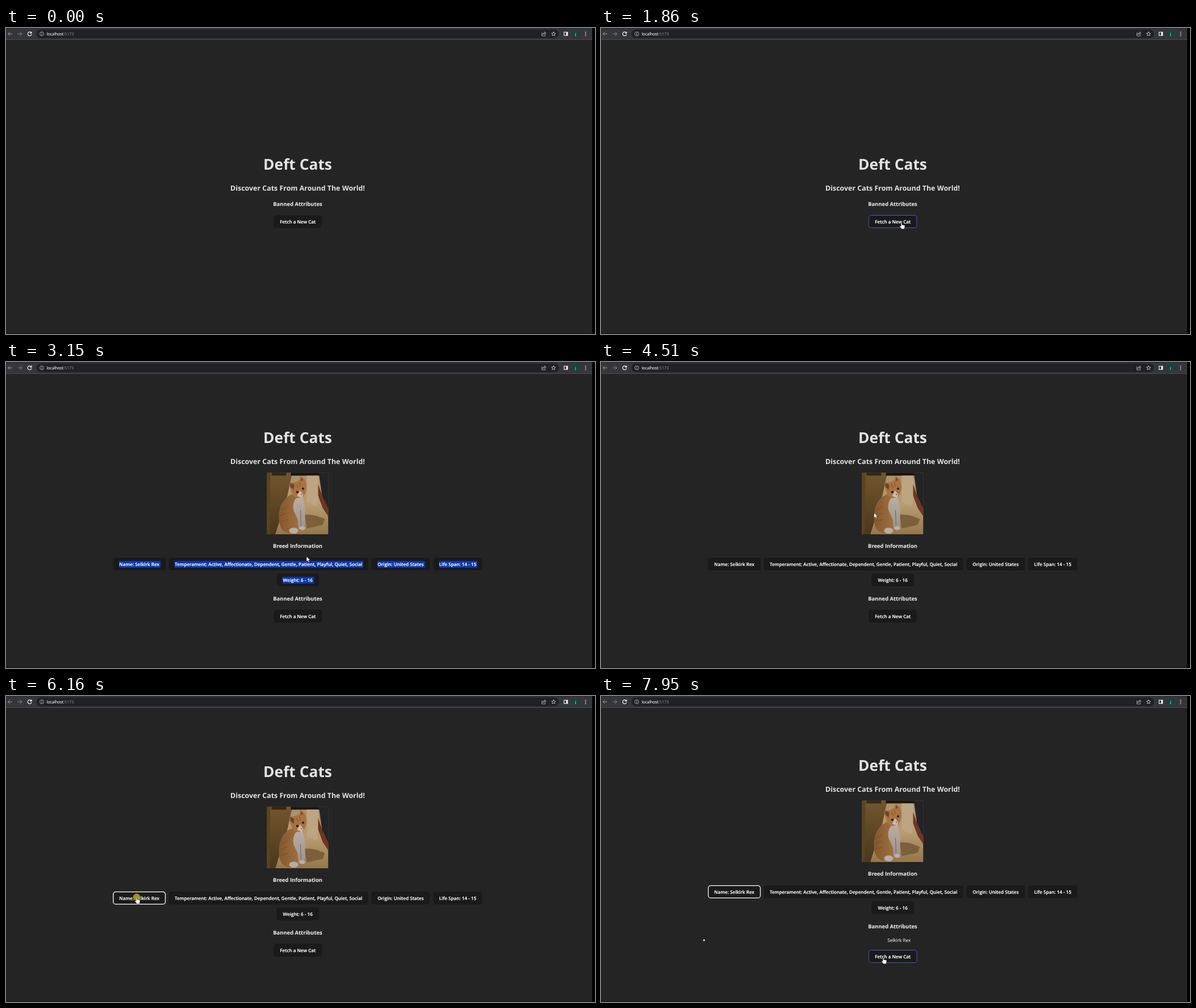
Write an HTML page that moves like this. It is 1037 px wide and 540 px high and loops after 8000 ms.

```html
<!DOCTYPE html>
<html lang="en">
<head>
<meta charset="utf-8">
<title>Deft Cats</title>
<style>
  html, body { margin: 0; width: 100%; height: 100%; overflow: hidden; background: #242424; }
  svg { display: block; width: 100vw; height: 100vh; }
  text { font-family: "Open Sans", "Noto Sans", sans-serif; fill: #e3e3e3; text-anchor: middle; text-rendering: geometricPrecision; }
  .h1 { font-size: 26.4px; font-weight: 700; }
  .h2 { font-size: 12.42px; font-weight: 700; }
  .h3 { font-size: 9.42px; font-weight: 700; stroke: #e3e3e3; stroke-width: .12; }
  .label { font-size: 8.13px; font-weight: 600; fill: #fff; stroke: #fff; stroke-width: .2; }
  .item { font-size: 8.2px; stroke: #e3e3e3; stroke-width: .1; }
  .url { font-size: 7.1px; text-anchor: start; fill: #e8eaed; stroke: #e8eaed; stroke-width: .15; }
  .url tspan { fill: #969a9e; stroke: none; }
  .box { fill: #1a1a1a; }
  .hover { fill: none; stroke: #5a61e2; stroke-width: .85; }
  .ring { fill: none; stroke: #fff; stroke-width: 1.25; }
  .mark { fill: #0b38ac; }
  .icon { fill: none; stroke: #c4c6c9; stroke-width: 1; }
</style>
</head>
<body>
<svg viewBox="0 0 1037 540" preserveAspectRatio="none">
  <defs>
    <clipPath id="frame"><rect width="108" height="108.5"/></clipPath>
    <linearGradient id="floor" x2="0" y2="1">
      <stop offset="0" stop-color="#a98f69"/><stop offset=".5" stop-color="#b89c72"/><stop offset="1" stop-color="#94764a"/>
    </linearGradient>
    <linearGradient id="wood" x2="0" y2="1">
      <stop offset="0" stop-color="#72572f"/><stop offset="1" stop-color="#4a361c"/>
    </linearGradient>
    <linearGradient id="fur">
      <stop offset="0" stop-color="#83582e"/><stop offset="1" stop-color="#a87645"/>
    </linearGradient>
    <linearGradient id="bib" x2="0" y2="1">
      <stop offset="0" stop-color="#b9ada3"/><stop offset="1" stop-color="#9d948f"/>
    </linearGradient>
    <filter id="soft" color-interpolation-filters="sRGB"><feGaussianBlur stdDeviation=".7"/></filter>
  </defs>

  <rect width="1037" height="540" fill="#242424"/>
  <rect y="538" width="1037" height="2" fill="#1d1b1d"/>

  <g id="bar">
    <rect width="1032" height="20" fill="#35363a"/>
    <rect width="1032" height="1" fill="#292a2d"/>
    <rect y="20" width="1032" height="1" fill="#4b4c50"/>
    <rect x="53.5" y="2.5" width="920" height="15.5" rx="7.7" fill="#202124"/>
    <path class="icon" style="stroke:#9a9ca0" d="M11 10.3H3.5M7 6.8 3.5 10.3 7 13.8"/>
    <path class="icon" style="stroke:#86888c" d="M20.5 10.3H28M24.5 6.8 28 10.3 24.5 13.8"/>
    <path class="icon" style="stroke:#f1f3f4;stroke-width:1.2" d="M44.4 8.3A3.4 3.4 0 1 0 45 11M45 6.5V9.2H42.2"/>
    <circle class="icon" cx="63" cy="10.3" r="3.5" style="stroke-width:.8"/>
    <path class="icon" d="M63 9.8V12.3M63 8.1V9"/>
    <text class="url" x="71.5" y="12.9">localhost<tspan>:5173</tspan></text>
    <path class="icon" style="stroke-width:.8" d="M944.5 8.5H943.5V14H949.5V12.3M945 11.8Q945.5 8.7 948.3 8.6V6.8L951 9.2 948.3 11.4V9.9Q946.4 9.9 945 11.8Z"/>
    <path class="icon" style="stroke-width:.9" d="M964 6.6 965 9.1 967.6 9.3 965.6 11 966.3 13.6 964 12.2 961.7 13.6 962.4 11 960.4 9.3 963 9.1Z"/>
    <rect x="982" y="6.8" width="7.3" height="7" fill="#f1f3f4"/>
    <rect x="983.1" y="7.9" width="3.1" height="4.8" fill="#35363a"/>
    <circle cx="1003" cy="10.3" r="6" fill="#0d4740"/>
    <text x="1003" y="12.6" style="font-size:6px;font-weight:600;fill:#e4efec">J</text>
    <g fill="#dcdee1"><circle cx="1020.5" cy="7.4" r=".9"/><circle cx="1020.5" cy="10.4" r=".9"/><circle cx="1020.5" cy="13.4" r=".9"/></g>
  </g>
  <rect x="1032" width="5" height="540" fill="#000"/>

  <g id="head">
    <text class="h1" x="513.5" y="250">Deft Cats</text>
    <text class="h2" x="513.5" y="287.4">Discover Cats From Around The World!</text>
  </g>

  <g id="breed">
    <g id="photo" transform="translate(459.5 195.5)" clip-path="url(#frame)">
      <rect width="108" height="109" fill="url(#floor)"/>
      <g filter="url(#soft)">
        <path d="M-2-2H45L36 40 14 111H-2Z" fill="url(#wood)"/>
        <path d="M-2-2H6L5 111H-2Z" fill="#5a431f"/>
        <path d="M8-2H34V5H8Z" fill="#33261a"/>
        <path d="M42-2H110V5H42Z" fill="#1b140e"/>
        <path d="M70 5H90L92 28 88 60 70 52Z" fill="#bda582"/>
        <path d="M91-2H110V72L97 42Z" fill="#222327"/>
        <path d="M90 20 97 40 110 68V80L98 62 90 40Z" fill="#6d3520"/>
        <path d="M66 74Q82 72 102 82L98 92 70 98Z" fill="#7c6039"/>
        <path d="M44 38C31 43 20 58 21 78 21 96 27 106 42 107L58 102 66 60 60 40Z" fill="url(#fur)"/>
        <path d="M51 45C46 52 45 59 47 67L54 82 56 99 64 99 67 90 67 62 63 43Z" fill="url(#bib)"/>
        <path d="M59 66 60 97" stroke="#776c64" stroke-width="1.2"/>
        <ellipse cx="47" cy="102" rx="8" ry="5.2" fill="#b8aea4"/>
        <ellipse cx="62" cy="97.5" rx="5.5" ry="3.6" fill="#b9b0a7"/>
        <path d="M40 24 40 17 48 17 57 13 59 5 66 11C71 20 71 32 65 40 58 47 46 45 43 34Z" fill="#a87340"/>
        <path d="M41 25V18L48 21 47 30Z" fill="#6a452d"/>
        <path d="M59 15 60 8 64 13Z" fill="#744a33"/>
        <path d="M58 31 61 35 64 39 61 44 53 41 55 37Z" fill="#c9bcae"/>
        <ellipse cx="53.5" cy="34" rx="2.4" ry="2.1" fill="#242016"/>
        <ellipse cx="63.5" cy="28" rx="2" ry="2.1" fill="#242016"/>
        <path d="M59 38 62 37 61 40Z" fill="#8f5848"/>
        <path d="M25 66 36 60M23 76 35 71M24 86 37 82M52 20 55 27M57 17 59 24" stroke="#704722" stroke-width="1.2" opacity=".6"/>
      </g>
    </g>
    <text class="h3" x="513.5" y="328.4">Breed Information</text>
    <g id="facts"></g>
  </g>

  <text id="banned" class="h3" x="513.5" y="313.5">Banned Attributes</text>
  <g id="item">
    <circle cx="181.4" cy="430.9" r="1.6" fill="#e3e3e3"/>
    <text class="item" x="524.7" y="433.5">Selkirk Rex</text>
  </g>
  <g id="fetch"></g>

  <circle id="dot" r="6.2" fill="#a8a10c" opacity=".92"/>
  <g id="cursor">
    <path id="arrow" d="M0 0V9.4L2.2 7.4 3.7 10.8 5.3 10.1 3.8 6.8H6.7Z" fill="#fff" stroke="#111" stroke-width=".6"/>
    <path id="hand" d="M-.9 .9Q0-.3 .9 .9V4.3L5 5.1Q6.3 5.5 6.1 7L5.2 9.9V11.8H-.3V10.6L-3 7.4Q-3.2 6.1-2 6.2L-.9 7.2Z" fill="#fff" stroke="#111" stroke-width=".5"/>
  </g>
</svg>
<script>
const LOOP = 8000, FADE = 250;
const $ = id => document.getElementById(id);
const clamp = v => Math.max(0, Math.min(1, v));
const within = (t, a, b) => t >= a && t < b;
const show = (el, on) => el.setAttribute('visibility', on ? 'visible' : 'hidden');
const move = (el, x, y) => el.setAttribute('transform', `translate(${x} ${y})`);

function add(parent, tag, attrs, text = '') {
  const el = document.createElementNS('http://www.w3.org/2000/svg', tag);
  for (const k in attrs) el.setAttribute(k, attrs[k]);
  el.textContent = text;
  return parent.appendChild(el);
}

function button(parent, label, x, y, width) {
  const rect = (cls, pad) => add(parent, 'rect', {
    class: cls, x: x + pad, y: y + pad, width: width - 2 * pad, height: 23 - 2 * pad, rx: 4.5 - pad / 2
  });
  rect('box', .2);
  const mark = add(parent, 'rect', { class: 'mark', x: x + 10.7, y: y + 6, width: width - 19.5, height: 12 });
  add(parent, 'text', { class: 'label', x: x + width / 2, y: y + 14.9 }, label);
  return { mark, hover: rect('hover', .5), ring: rect('ring', .7) };
}

const facts = [
  ['Name: Selkirk Rex', 188.2, 345, 93],
  ['Temperament: Active, Affectionate, Dependent, Gentle, Patient, Playful, Quiet, Social', 286.3, 345, 351.5],
  ['Origin: United States', 643, 345, 103.6],
  ['Life Span: 14 - 15', 752, 345, 86.6],
  ['Weight: 6 - 16', 476, 373, 75.3]
].map(f => button($('facts'), ...f));
const fetchBtn = button($('fetch'), 'Fetch a New Cat', 470.8, 330, 85.8);

const ease = {
  lin: p => p,
  in: p => p * p,
  out: p => 1 - (1 - p) ** 2,
  both: p => p * p * (3 - 2 * p)
};

// time, x, y, easing towards this point
const path = [
  [240, 946, 513], [990, 532, 349, 'out'], [1320, 530, 344, 'out'], [1530, 529, 343, 'lin'],
  [3420, 529, 343, 'lin'], [3780, 596, 312, 'both'], [4160, 596, 312, 'lin'],
  [4510, 481, 266, 'in'], [4990, 382, 278, 'out'], [5760, 230, 355, 'both'],
  [6620, 230, 355, 'lin'], [7490, 422, 439, 'both'], [7950, 497, 461, 'out']
];
const handTimes = [[950, 2880], [5430, 6810], [7640, LOOP]];
const clicks = [[2060, 2280], [2500, 2650], [3800, 4030], [6160, 6290]];

function tip(t) {
  const i = path.findIndex(p => p[0] > t);
  if (i < 0) return path[path.length - 1].slice(1, 3);
  if (i === 0) return path[0].slice(1, 3);
  const [a, b] = [path[i - 1], path[i]];
  const p = ease[b[3]]((t - a[0]) / (b[0] - a[0]));
  return [a[1] + (b[1] - a[1]) * p, a[2] + (b[2] - a[2]) * p];
}

const fade = (t, on, off) => clamp((t - on) / FADE) - clamp((t - off) / FADE);

function draw(t) {
  const loaded = t >= 2880, listed = t >= 6290;
  const drop = loaded ? 107 : 0, lift = listed ? 11 : 0;

  move($('head'), 0, -drop - lift);
  move($('breed'), 0, -lift);
  $('breed').style.display = loaded ? '' : 'none';
  show($('photo'), t >= 3090);
  move($('banned'), 0, drop - lift);
  show($('item'), listed);
  move($('fetch'), 0, drop + lift);

  const picked = within(t, 3020, 3800);
  facts.forEach((f, i) => {
    f.mark.style.opacity = picked ? 1 : 0;
    f.hover.style.opacity = i ? 0 : fade(t, 5430, 6810);
    f.ring.style.opacity = !i && t >= 6160 ? 1 : 0;
  });
  fetchBtn.mark.style.opacity = 0;
  fetchBtn.hover.style.opacity = fade(t, 960, 2880) + fade(t, 7650, LOOP);
  fetchBtn.ring.style.opacity = within(t, 2060, 2880) ? 1 : 0;

  const [x, y] = tip(t);
  const hand = handTimes.some(h => within(t, ...h));
  move($('cursor'), x, y);
  show($('arrow'), t >= 240 && !hand);
  show($('hand'), hand);
  move($('dot'), x, y);
  show($('dot'), clicks.some(c => within(t, ...c)));
}

const start = performance.now();
function tick() {
  draw((performance.now() - start) % LOOP);
  requestAnimationFrame(tick);
}
tick();
</script>
</body>
</html>
```
